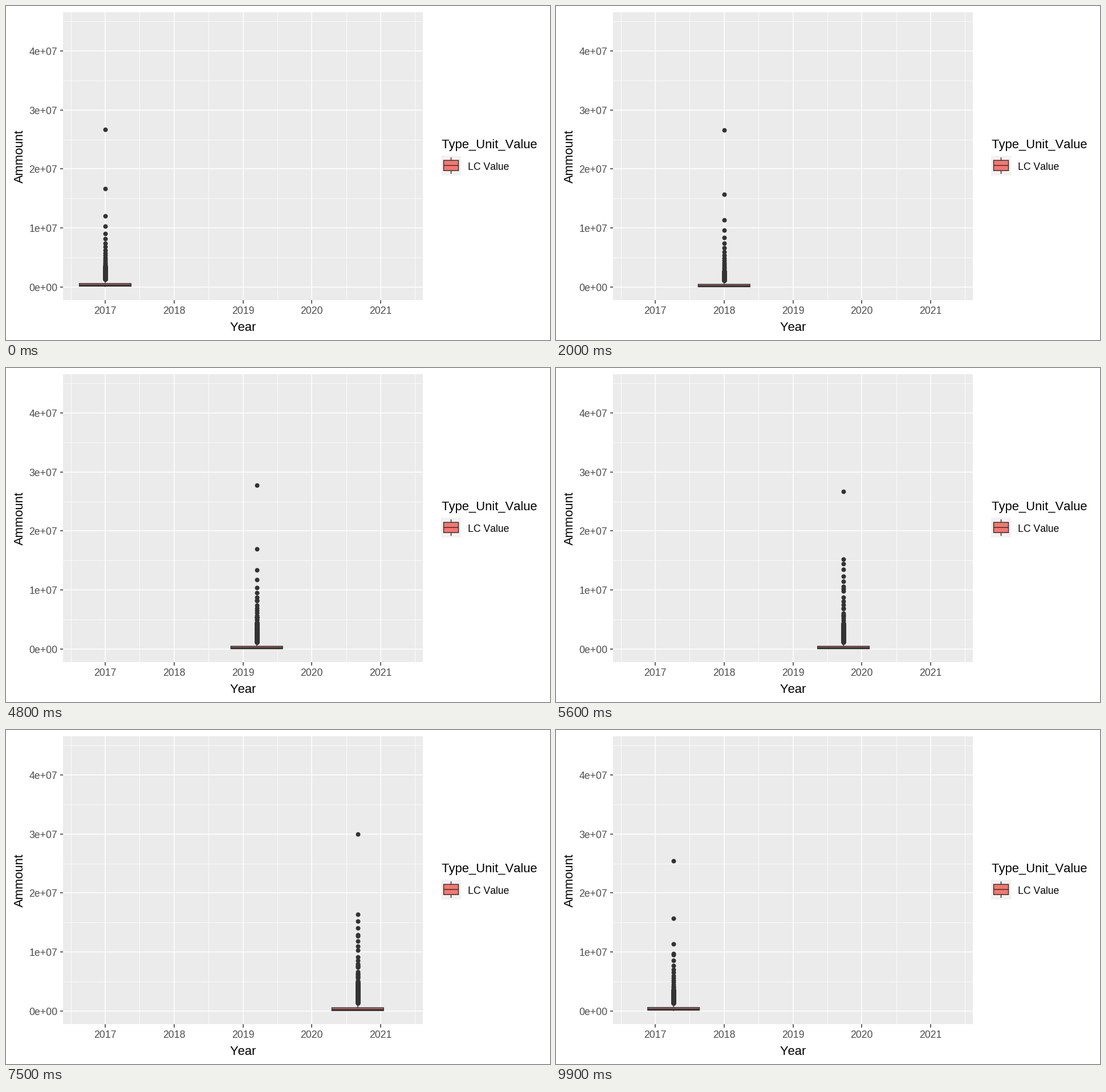
Recreate the animation shown at these times as a matplotlib script. Size 954 by 587 pixels, loop 10 s.

```python
import numpy as np
import matplotlib.pyplot as plt
from matplotlib.animation import FuncAnimation
from matplotlib.patches import Rectangle

W, H, DPI = 954, 587, 64
PT = 72 / DPI  # points per pixel
FRAMES, STEP = 100, 20
DARK, GREY, FILL = "#333333", "#4D4D4D", "#F8766D"
LEFT, RIGHT, TOP, BOTTOM = 100, 731, 11, 517
LINE = 1.5

plt.rcParams["font.family"] = "Liberation Sans"
plt.rcParams["text.kerning_factor"] = 20  # plain advances, no kerning
rng = np.random.default_rng(7)

# One row per year, amounts in millions:
# peak, runner-up, decay rate and bend of the outliers, first and third quartile
YEARS = [
    (26.7, 16.7, 0.33, 0.56, 0.13, 0.59),
    (26.6, 15.7, 0.32, 0.62, 0.03, 0.45),
    (34.3, 20.8, 0.25, 0.63, 0.03, 0.46),
    (35.9, 20.1, 0.06, 1.15, 0.04, 0.46),
    (44.3, 23.7, 0.085, 1.0, 0.06, 0.59),
]


def px(year):
    return LEFT + 120.77 * (year - 2016.3875)


def py(millions):
    return 493.8 - 10.37 * np.asarray(millions)


def box_stats(i):
    """Lower whisker, quartiles and upper whisker."""
    q1, q3 = YEARS[i][4:]
    return np.array([0, q1, q1 + 0.35 * (q3 - q1), q3, q3 + 1.5 * (q3 - q1)])


def far(i):
    """Scattered outliers, largest first."""
    peak, second, rate, bend = YEARS[i][:4]
    return np.append(peak, second * np.exp(-rate * np.arange(17) ** bend))


def near(i):
    """Dense outliers between the whisker and the scattered ones."""
    low, high = box_stats(i)[-1] + 0.05, far(i)[-1]
    return low + (high - low) * np.linspace(0, 1, 120) ** 2


def partners(first):
    """Small values that the far outliers grow from or shrink to."""
    low = 1.4 + 0.3 * (np.arange(18) % 4)
    low[0] = first
    return low


def link(a, b, peak_to=1.4, peak_from=1.4):
    """Paired outlier values at the start and end of a transition."""
    start = np.concatenate([near(a), far(a), partners(peak_from)])
    end = np.concatenate([rng.permutation(near(b)), partners(peak_to), far(b)])
    return start, end


LINKS = [link(i, i + 1) for i in range(4)] + [link(4, 0, 7.0, 8.5)]

fig = plt.figure(figsize=(W / DPI, H / DPI), dpi=DPI, facecolor="white")
ax = fig.add_axes([0, 0, 1, 1])
ax.set_xlim(0, W)
ax.set_ylim(H, 0)
ax.axis("off")


def line(xs, ys, color, width, z, snap=None):
    return ax.plot(xs, ys, color=color, lw=width * PT, zorder=z, snap=snap,
                   solid_capstyle="butt")[0]


def rect(x, y, w, h, z, fill, edge="none"):
    return ax.add_patch(Rectangle((x, y), w, h, facecolor=fill, edgecolor=edge,
                                  lw=LINE * PT, zorder=z, joinstyle="miter",
                                  snap=False))


def text(x, y, label, size, color="black", ha="left", **kw):
    ax.text(x, y, label, fontsize=size * PT, color=color, ha=ha,
            va="baseline", **kw)


# Panel, grid and axes
rect(LEFT, TOP, RIGHT - LEFT, BOTTOM - TOP, 0, "#EBEBEB")
for k in range(6):
    line([px(2016.5 + k)] * 2, [TOP, BOTTOM], "white", 0.75, 1)
for k in range(5):
    x, y = px(2017 + k), py(10 * k)
    line([LEFT, RIGHT], [py(5 + 10 * k)] * 2, "white", 0.75, 1)
    line([LEFT, RIGHT], [y, y], "white", LINE, 2)
    line([x, x], [TOP, BOTTOM], "white", LINE, 2)
    line([LEFT - 5.5, LEFT], [y, y], DARK, LINE, 2)
    line([x, x], [BOTTOM, BOTTOM + 5.5], DARK, LINE, 2)
    text(90, y + 7, f"{k}e+07" if k else "0e+00", 17.6, GREY, "right")
    text(x, 541.3, str(2017 + k), 17.6, GREY, "center")
text(415.5, 571, "Year", 22, ha="center")
text(29.5, 264, "Ammount", 22, ha="center", rotation=90,
     rotation_mode="anchor")

# Legend
text(763, 250, "Type_Unit_Value", 22)
text(810, 287.5, "LC Value", 17.6)
rect(763, 263, 35, 35, 0, "#F2F2F2")
line([780.5] * 2, [266, 295], DARK, LINE, 1, False)
rect(767.5, 271.3, 26, 18, 2, FILL, DARK)
line([767.5, 793.5], [280.3] * 2, DARK, LINE, 3, False)

# Moving box plot
HALF = 45.3
dots = ax.plot([], [], "o", ms=8 * PT, color=DARK, mew=0, zorder=4,
               snap=False)[0]
whiskers = [line([], [], DARK, LINE, 5, False) for _ in range(2)]
box = rect(0, 0, 2 * HALF, 1, 6, FILL, DARK)
median = line([], [], DARK, 2.6, 7, False)


def draw(frame):
    i = frame // STEP
    j = (i + 1) % 5
    hold = 5 if i else 4
    t = max(0, (frame % STEP - hold) / (STEP - hold))

    x = px(2017 + i + (j - i) * t)
    start, end = LINKS[i]
    values = start + (end - start) * t
    low, q1, mid, q3, high = py(box_stats(i) * (1 - t) + box_stats(j) * t)

    dots.set_data(np.full(len(values), x), py(values))
    whiskers[0].set_data([x, x], [q3, high])
    whiskers[1].set_data([x, x], [q1, low])
    box.set_xy((x - HALF, q3))
    box.set_height(q1 - q3)
    median.set_data([x - HALF, x + HALF], [mid, mid])
    return dots, *whiskers, box, median


anim = FuncAnimation(fig, draw, frames=FRAMES, interval=100, repeat=True,
                     repeat_delay=0, blit=False)
plt.show()
```
